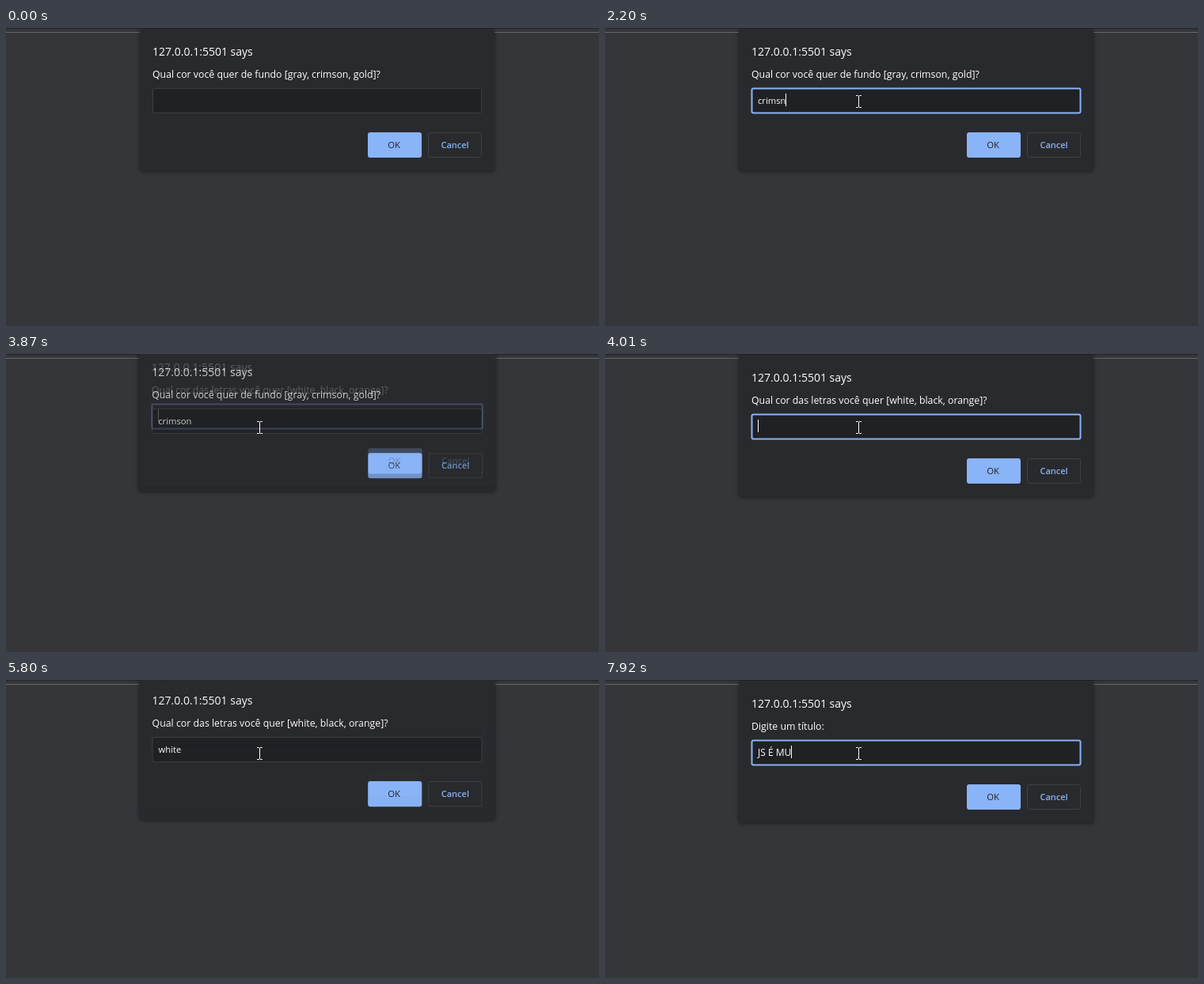
An HTML page for the animation above (8 s loop, 749x377 px).

```html
<!DOCTYPE html>
<html lang="pt">
<head>
<meta charset="utf-8">
<style>
  html, body { margin: 0; width: 100%; height: 100%; overflow: hidden; background: #35363a; }
  svg { display: block; }
  text { font-family: "Open Sans", "Noto Sans", sans-serif; fill: #fff; white-space: pre; }
  .title { font-size: 14px; }
  .message { font-size: 12.32px; }
  .button { font-size: 11.3px; text-anchor: middle; }
  .cancel { font-size: 11px; font-weight: 600; }
  .panel { fill: #292a2d; filter: drop-shadow(0 1px 2.5px rgba(0, 0, 0, .5)); }
  .field { fill: #202124; stroke: #3c4043; }
  .focused .field { stroke: #8ab4f8; stroke-width: 2; }
  .caret { fill: #fff; shape-rendering: crispEdges; }
</style>
</head>
<body>
<svg id="stage" width="749" height="377" viewBox="0 0 749 377">
  <rect width="749" height="1" fill="#242528"/>
  <rect y="5" width="749" height="1" fill="#67686b"/>
  <g id="dialogs"></g>
  <path id="arrow" d="M.5.5V16.5L4.3 13 6.8 18.6 9.2 17.6 6.7 12H11.8Z" fill="#fff" stroke="#000"/>
  <path id="beam" d="M-3 -7.5H0M1 -7.5H4M.5 -7V7M-3 7.5H0M1 7.5H4" fill="none" stroke="#fff"/>
</svg>
<script>
const LOOP = 8000;
const FOCUS_TIME = 730;
const MOUSE = { start: 130, step: 75, steps: 10, from: [636, 341], to: [320, 93] };

const questions = [
  ["Qual cor você quer de fundo [gray, crimson, gold]?", 11.2],
  ["Qual cor das letras você quer [white, black, orange]?", 11.2],
  ["Digite um título:", 12],
];

// Per dialog: [time, typed text, caret visible]
const typing = [
  [[0, "", 0], [FOCUS_TIME, "", 1], [1210, "", 0], [1410, "c", 1], [1610, "cr", 1], [1740, "cri", 1],
   [1940, "crim", 1], [2070, "crims", 1], [2200, "crimsn", 1], [2680, "crimsn", 0],
   [3140, "crims", 1], [3340, "crimso", 1], [3610, "crimson", 1]],
  [[0, "", 1], [4410, "", 0], [4870, "w", 1], [5070, "wh", 1], [5270, "whi", 1],
   [5470, "whit", 1], [5670, "white", 1]],
  [[0, "", 1], [6340, "", 0], [6410, "J", 1], [6540, "JS", 1], [6870, "JS ", 1], [7400, "JS ", 0],
   [7530, "JS É", 1], [7610, "JS É ", 1], [7720, "JS É M", 1], [7920, "JS É MU", 1]],
];

// A swap runs in 70 ms steps: the closing dialog rises while the next drops in.
// Poses are [y, opacity, scale].
const STEP = 70;
const swaps = [3800, 5800];
const closing = [[-4, 1, 1.002], [-7, 1, 1.004], [-10, .6, 1.006]];
const opening = [[-18, .015, 1.008], [-13, .24, 1.006], [-4, .85, 1.002]];
const firstStep = [1, 0];
const SHOWN = [0, 1, 1], HIDDEN = [0, 0, 1];

const $ = id => document.getElementById(id);

function makeDialog([message, size]) {
  const g = document.createElementNS("http://www.w3.org/2000/svg", "g");
  g.innerHTML = `
    <rect class="panel" x="169" y="1" width="448" height="179.5" rx="4"/>
    <text class="title" x="185" y="35">127.0.0.1:5501 says</text>
    <text class="message" x="185" y="63">${message}</text>
    <rect class="field" x="185.5" y="76.5" width="415" height="31" rx="2"/>
    <text class="value" x="193" y="96" font-size="${size}"></text>
    <rect class="caret" y="83" width="1" height="16"/>
    <rect x="457" y="132" width="68" height="32" rx="3" fill="#8ab4f8"/>
    <text class="button" x="490" y="152" style="fill:#202124">OK</text>
    <rect x="533.5" y="132.5" width="67" height="31" rx="3" fill="none" stroke="#3f4145"/>
    <text class="button cancel" x="567" y="152" style="fill:#8ab4f8">Cancel</text>`;
  $("dialogs").append(g);
  return { g, value: g.querySelector(".value"), caret: g.querySelector(".caret") };
}
const dialogs = questions.map(makeDialog);

const swapStep = (i, t) => Math.floor((t - swaps[i]) / STEP);

function pose(i, t) {
  if (i < swaps.length) {
    const k = swapStep(i, t);
    if (k >= closing.length) return HIDDEN;
    if (k >= firstStep[i]) return closing[k];
  }
  if (i > 0) {
    const k = swapStep(i - 1, t);
    if (k < firstStep[i - 1]) return HIDDEN;
    if (k < opening.length) return opening[k];
  }
  return SHOWN;
}

function drawDialog(i, t) {
  const { g, value, caret } = dialogs[i];
  const [y, opacity, scale] = pose(i, t);
  g.style.display = opacity ? "" : "none";
  if (!opacity) return;
  g.setAttribute("transform", `translate(393 ${90 + y}) scale(${scale}) translate(-393 -90)`);
  g.setAttribute("opacity", opacity);

  const isClosing = i < swaps.length && swapStep(i, t) >= firstStep[i];
  const focused = !isClosing && (i > 0 || t >= FOCUS_TIME);
  const [, text, caretOn] = typing[i].findLast(e => e[0] <= t);
  g.classList.toggle("focused", focused);
  value.textContent = text;
  caret.setAttribute("x", 193 + Math.round(text ? value.getComputedTextLength() : 0));
  caret.style.display = focused && caretOn ? "" : "none";
}

function drawMouse(t) {
  const { start, step, steps, from, to } = MOUSE;
  const p = Math.min(1, Math.floor((t - start) / step) / steps);
  const ease = 1 - (1 - p) ** 3;
  const [x, y] = from.map((a, i) => Math.round(a + (to[i] - a) * ease));
  const overField = y < 108;
  $("arrow").style.display = t >= start && !overField ? "" : "none";
  $("beam").style.display = t >= start && overField ? "" : "none";
  $(overField ? "beam" : "arrow").setAttribute("transform", `translate(${x} ${y})`);
}

function frame(now) {
  const t = now % LOOP;
  dialogs.forEach((_, i) => drawDialog(i, t));
  drawMouse(t);
  requestAnimationFrame(frame);
}
requestAnimationFrame(frame);
</script>
</body>
</html>
```
